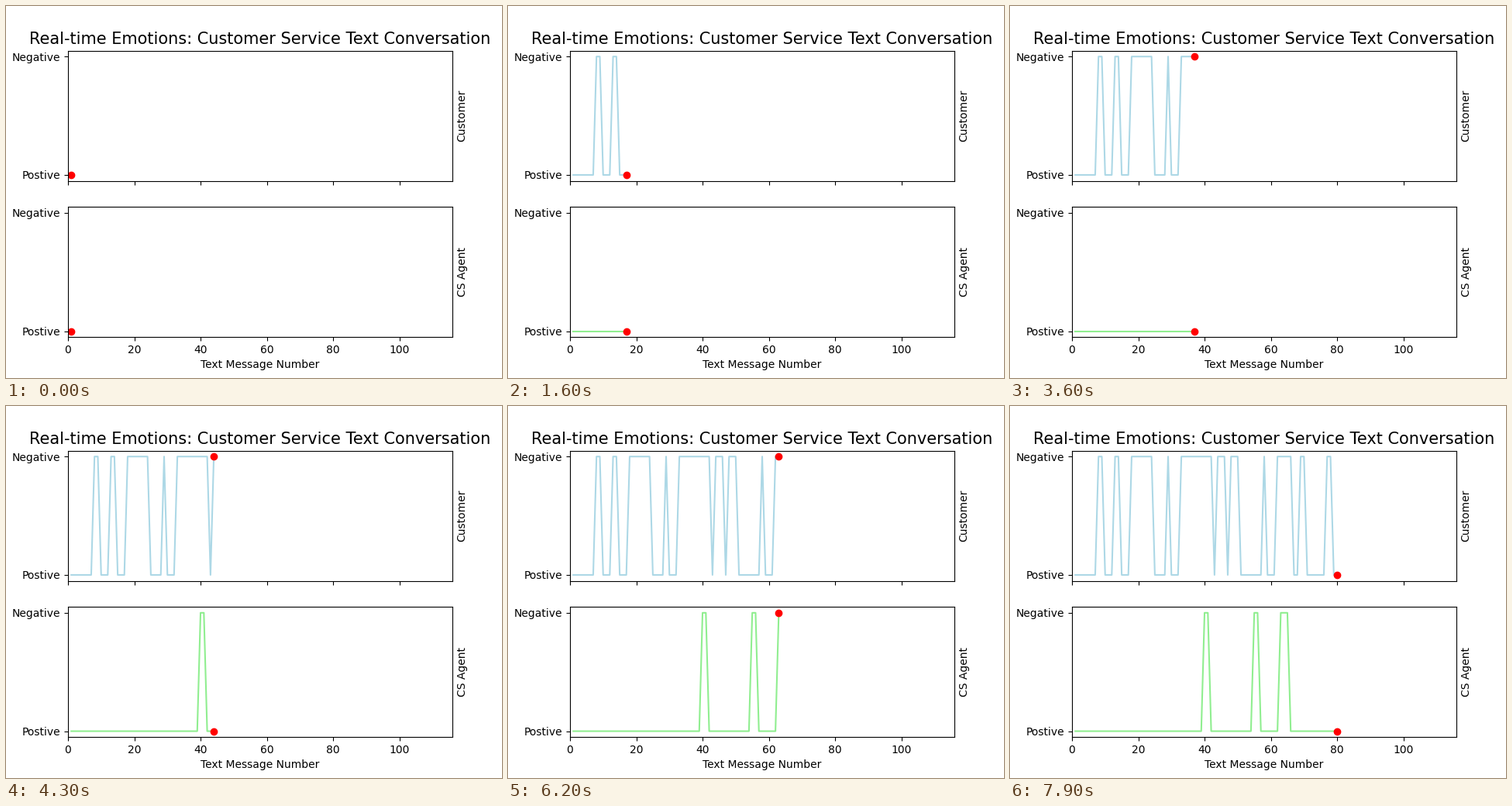
Recreate the animation shown at these times as a matplotlib script. Size 640 by 480 pixels, loop 8 s.

```python
import numpy as np
import matplotlib.pyplot as plt
from matplotlib.animation import FuncAnimation

FRAMES = 80
X_MAX = 116

# Inclusive message ranges with a negative emotion
CUSTOMER = [(8, 9), (13, 14), (18, 24), (29, 29), (33, 42), (44, 46),
            (48, 50), (58, 58), (62, 66), (69, 70), (77, 78)]
AGENT = [(40, 41), (55, 56), (63, 65)]

messages = np.arange(1, FRAMES + 1)


def emotion(runs):
    """Return 1 inside the given runs, 0 elsewhere."""
    return sum(((messages >= a) & (messages <= b)).astype(int) for a, b in runs)


fig, axes = plt.subplots(2, 1, sharex=True, figsize=(6.4, 4.8), dpi=100)


def make_panel(ax, label, color, runs):
    ax.set_xlim(0, X_MAX)
    ax.set_ylim(-0.05, 1.05)
    ax.set_yticks([0, 1], ["Postive", "Negative"])
    ax.set_ylabel(label)
    ax.yaxis.set_label_position("right")
    line, = ax.plot([], [], color=color)
    dot, = ax.plot([], [], "o", color="red")
    return line, dot, emotion(runs)


panels = [
    make_panel(axes[0], "Customer", "lightblue", CUSTOMER),
    make_panel(axes[1], "CS Agent", "lightgreen", AGENT),
]
axes[0].set_title("Real-time Emotions: Customer Service Text Conversation",
                  fontsize=15)
axes[1].set_xlabel("Text Message Number")
axes[1].set_xticks(range(0, X_MAX, 20))


def update(i):
    artists = []
    for line, dot, values in panels:
        line.set_data(messages[:i + 1], values[:i + 1])
        dot.set_data(messages[i:i + 1], values[i:i + 1])
        artists += [line, dot]
    return artists


anim = FuncAnimation(fig, update, frames=FRAMES, interval=100, repeat=True)
plt.show()
```
